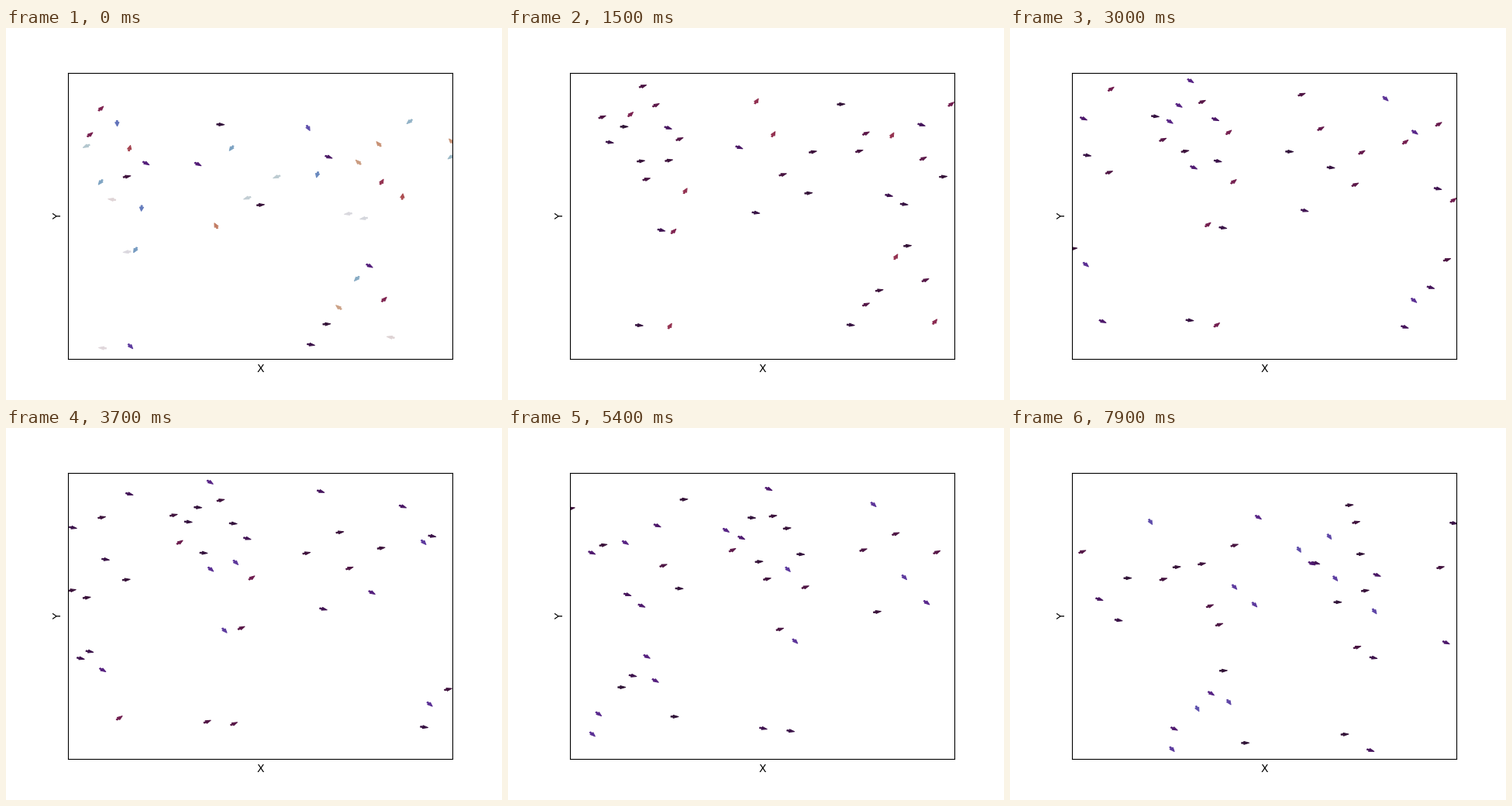
These frames come from a looping animation (640 px wide and 480 px high, 8 s). A matplotlib script:

```python
import numpy as np
import matplotlib.pyplot as plt
from matplotlib.animation import FuncAnimation
from matplotlib.collections import PolyCollection

FRAMES, INTERVAL = 80, 100
LEFT, RIGHT, TOP, BOTTOM = 80, 576, 57.6, 427.2
ORIGIN = np.array([LEFT, TOP])
SIZE = np.array([RIGHT - LEFT, BOTTOM - TOP])
ASPECT = SIZE[1] / SIZE[0]
SPEED = 4.6       # pixels per step along x
NOISE = 0.85      # half range of the heading noise

# Loose groups at the start: count, then x and y ranges in pixels.
GROUPS = [
    (10, (95, 185), (95, 240)),
    (7, (240, 350), (120, 266)),
    (10, (385, 527), (108, 256)),
    (2, (572, 576), (90, 232)),
    (2, (145, 180), (282, 295)),
    (2, (108, 170), (408, 417)),
    (7, (387, 513), (296, 425)),
]

# Arrow outline: along and across the heading, in pixels of x.
ARROW = np.array([(-5, 0.9), (-2, 0.9), (-2, 2.6), (4.8, 0),
                  (-2, -2.6), (-2, -0.9), (-5, -0.9)])


def scatter(rng):
    """Spread each group evenly over its box, one particle per column."""
    points = []
    for count, xs, ys in GROUPS:
        columns = (np.arange(count) + rng.uniform(0, 1, count)) / count
        rows = (rng.permutation(count) + rng.uniform(0, 1, count)) / count
        points.append(np.column_stack([xs[0] + columns * np.ptp(xs),
                                       ys[0] + rows * np.ptp(ys)]))
    return np.concatenate(points)


def simulate():
    """Random headings first, then one flock whose course eases downward."""
    rng = np.random.default_rng(4)
    start = scatter(rng)
    course = 1.4 * np.exp(-np.arange(FRAMES) / 26) - 0.45
    heading = course[:, None] + rng.uniform(-NOISE, NOISE,
                                            (FRAMES, len(start)))
    heading[0] = rng.uniform(-np.pi, np.pi, len(start))

    step = SPEED * np.stack(
        [np.cos(heading), -ASPECT * np.sin(heading)], axis=-1)
    step[0] = 0
    place = start + np.cumsum(step, axis=0)
    return (place - ORIGIN) % SIZE + ORIGIN, heading


def arrows(place, heading):
    along, across = ARROW.T
    c, s = np.cos(heading)[:, None], np.sin(heading)[:, None]
    x = place[:, :1] + along * c - across * s
    y = place[:, 1:] - ASPECT * (along * s + across * c)
    return np.stack([x, y], axis=-1)


def colors(heading):
    turn = (heading + np.pi) % (2 * np.pi) / (2 * np.pi)
    return plt.get_cmap("twilight")(turn)


places, headings = simulate()

fig, ax = plt.subplots(figsize=(6.4, 4.8), dpi=100)
ax.set(xlim=(LEFT, RIGHT), ylim=(BOTTOM, TOP), xticks=[], yticks=[],
       xlabel="X", ylabel="Y")
flock = PolyCollection(arrows(places[0], headings[0]), linewidths=0.75,
                       joinstyle="round", color=colors(headings[0]))
ax.add_collection(flock, autolim=False)


def update(n):
    flock.set_verts(arrows(places[n], headings[n]))
    flock.set_color(colors(headings[n]))
    return [flock]


anim = FuncAnimation(fig, update, frames=FRAMES, interval=INTERVAL,
                     repeat=True, repeat_delay=0)
plt.show()
```
